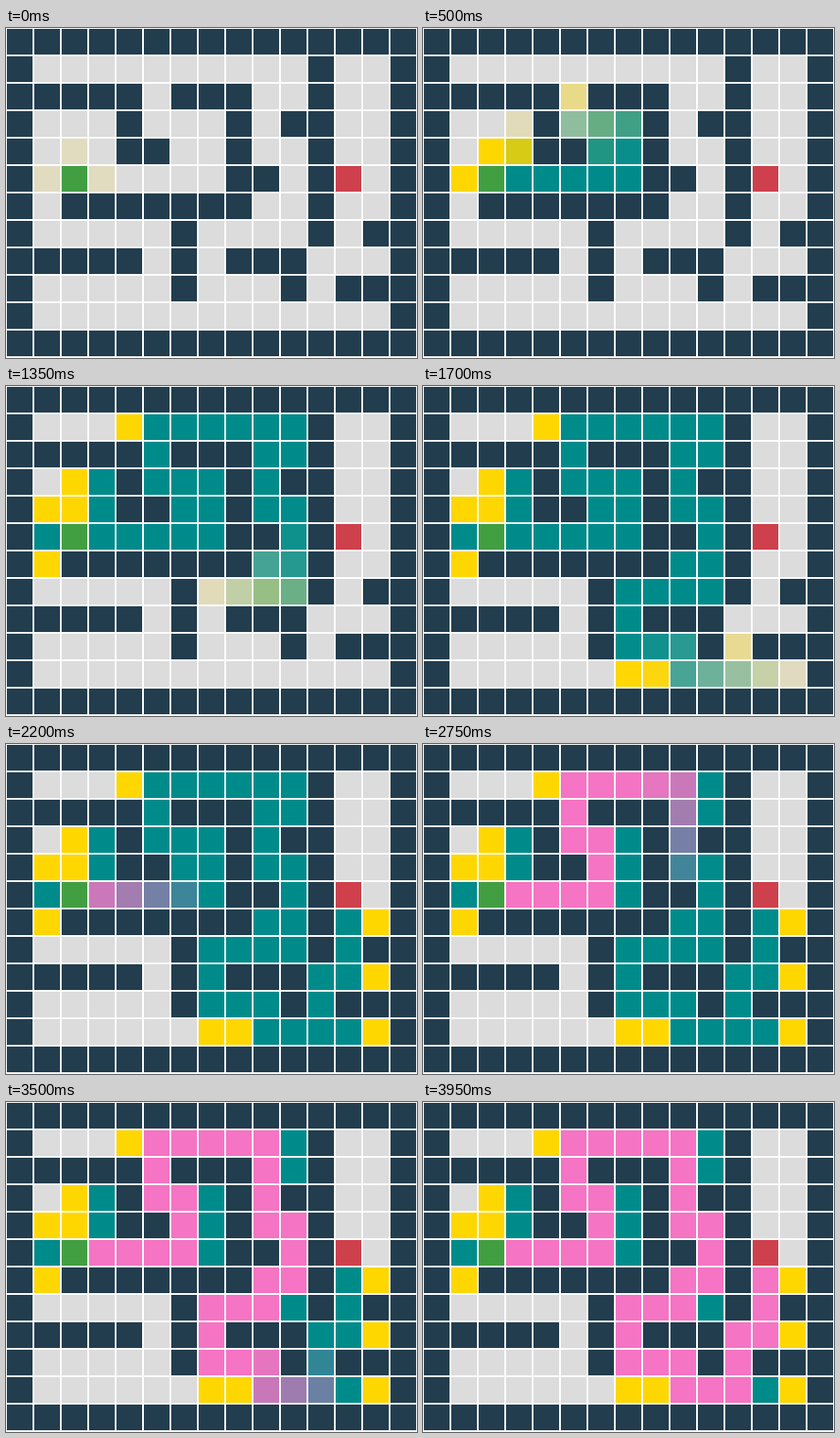
Animation, 465 px wide and 373 px high, one loop 4.85 s. Source, as a matplotlib script:

```python
import numpy as np
import matplotlib.pyplot as plt
from matplotlib.animation import FuncAnimation
from matplotlib.colors import to_rgb
from matplotlib.patches import Rectangle

W, H, DPI = 465, 373, 64
CELL, INSET = 31, 1
INTERVAL, FRAMES = 50, 97

MAZE = [
    "###############",
    "#..........#..#",
    "#####.###..#..#",
    "#...#...#.##..#",
    "#...##..#..#..#",
    "#.S.....##.#G.#",
    "#.#######..#..#",
    "#.....#....#.##",
    "#####.#.###...#",
    "#.....#...#.###",
    "#.............#",
    "###############",
]
START = (2, 5)
MOVES = {"R": (1, 0), "L": (-1, 0), "D": (0, 1), "U": (0, -1)}

WALL, FLOOR, WHITE = "#223d4e", "#dcdcdc", "#ffffff"
BASE = {"#": WALL, ".": FLOOR, "S": "#419f42", "G": "#ce404c"}
OPEN, CLOSED, PATH = (np.array(to_rgb(c)) for c in ("#ffd700", "#008b8b", "#f574c3"))

# Best-first search: each branch is a cell and the moves taken from it.
BRANCHES = [
    ((2, 5), "RRRRRUL"), ((7, 4), "ULL"), ((3, 5), "U"), ((5, 3), "U"),
    ((3, 4), "U"), ((2, 5), "L"), ((5, 2), "URRRRRDLDDRDDL"),
    ((10, 6), "D"), ((9, 6), "DLLDDRRDRRR"), ((11, 10), "UURUU"),
]
ROUTE = "RRRRUULUURRRRDDDRDDLDLLDDRRDRRUURUU"

# Times are counted in clock ticks; the clock skips a tick at each hold.
FADE = 4.8
HOLDS = {*range(250, 2501, 250), 2800, 3100, 3400, 3650, 3900}
LAST_TICK = 64


def walk(cell, moves):
    x, y = cell
    for m in moves:
        x, y = x + MOVES[m][0], y + MOVES[m][1]
        yield x, y


def search_time(step):
    return np.interp(step, [0, 22, 40, 46], [-0.39, 15.46, 27.63, 31.7])


def path_time(n):
    return np.interp(n, [1, 4, 16, 31, 35], [32.9, 35.24, 44.17, 56.4, 59.15])


def build_events():
    """Map each cell to its list of (tick, new colour)."""
    events = {}
    order = [START] + [c for cell, moves in BRANCHES for c in walk(cell, moves)]
    for step, cell in enumerate(order):
        t = search_time(step)
        if cell != START:
            events[cell].append((t, CLOSED))
        for m in "RLDU":
            x, y = next(walk(cell, m))
            if MAZE[y][x] == "." and (x, y) not in events:
                events[x, y] = [(t, OPEN)]
    for n, cell in enumerate(walk(START, ROUTE), 1):
        events[cell].append((path_time(n), PATH))
    return events


S = np.linspace(0, 1, 201)
EASE_X, EASE_Y = 1.74 * S**2 - 0.74 * S**3, 3 * S**2 - 2 * S**3


def ease_out(x):
    return np.interp(x, EASE_X, EASE_Y)


def colour_at(events, tick):
    """Colour of a cell; each fade starts from wherever the last one got to."""
    if not events:
        return np.array(to_rgb(FLOOR))
    *earlier, (start, target) = events
    if tick <= start:
        return colour_at(earlier, tick)
    before = colour_at(earlier, start)
    return before + (target - before) * ease_out((tick - start) / FADE)


def clock(frame):
    ticks = sum(i * INTERVAL not in HOLDS for i in range(1, frame + 1))
    return min(ticks, LAST_TICK)


fig = plt.figure(figsize=(W / DPI, H / DPI), dpi=DPI, facecolor=WHITE)
ax = fig.add_axes([0, 0, 1, 1])
ax.set(xlim=(0, W), ylim=(H, 0))
ax.axis("off")

tiles = {}
for y, row in enumerate(MAZE):
    for x, kind in enumerate(row):
        tiles[x, y] = ax.add_patch(Rectangle(
            (x * CELL + INSET, y * CELL + INSET),
            CELL - 2 * INSET, CELL - 2 * INSET,
            facecolor=BASE[kind], linewidth=0, antialiased=False))

EVENTS = build_events()


def draw(frame):
    tick = clock(frame)
    for cell, events in EVENTS.items():
        tiles[cell].set_facecolor(colour_at(events, tick))
    return [tiles[cell] for cell in EVENTS]


anim = FuncAnimation(fig, draw, frames=FRAMES, interval=INTERVAL,
                     init_func=lambda: draw(0), repeat=True, repeat_delay=0)
plt.show()
```
